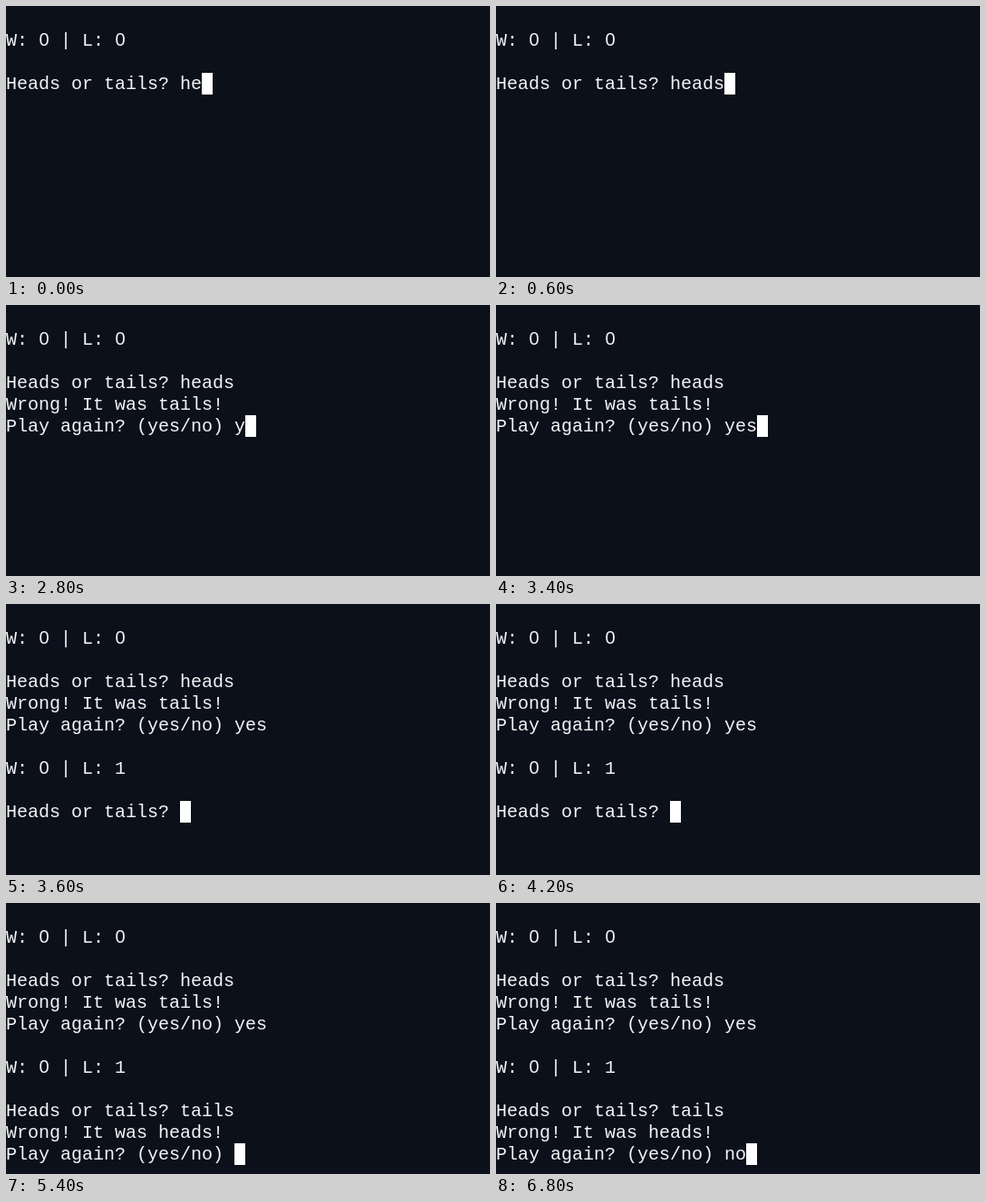
Write an HTML page that moves like this. It is 534 px wide and 300 px high and loops after 8 s.

```html
<!DOCTYPE html>
<html lang="en">
<head>
<meta charset="utf-8">
<title>Heads or tails</title>
<style>
  html, body {
    margin: 0;
    width: 100%;
    height: 100%;
    overflow: hidden;
    background: #0c101b;
  }
  #term {
    position: absolute;
    left: 0;
    top: 27px;
    margin: 0;
    color: #f4f5f7;
    font: 20px/24px "Courier New", "Liberation Mono", monospace;
    white-space: pre;
  }
  /* plain zero without the inner dot */
  .zero {
    display: inline-block;
    width: 12px;
    text-align: center;
    font-family: "Liberation Sans", sans-serif;
    line-height: 20px;
  }
  #cursor {
    position: absolute;
    left: 0;
    top: 26px;
    width: 12px;
    height: 24px;
    background: #fff;
  }
</style>
</head>
<body>
<pre id="term"></pre>
<div id="cursor"></div>
<script>
  const LOOP = 8000, CELL = 12, ROW = 24;
  const term = document.getElementById('term');
  const cursor = document.getElementById('cursor');

  const ask = losses => `W: 0 | L: ${losses}\n\nHeads or tails? `;
  const result = side => `\nWrong! It was ${side}!\nPlay again? (yes/no) `;

  const round1 = ask(0);
  const again1 = round1 + 'heads' + result('tails');
  const round2 = again1 + 'yes\n\n' + ask(1);
  const again2 = round2 + 'tails' + result('heads');

  // [start in ms, screen text]
  const steps = [
    [0, round1 + 'he'],
    [200, round1 + 'hea'],
    [600, round1 + 'heads'],
    [1000, again1],
    [2800, again1 + 'y'],
    [3000, again1 + 'ye'],
    [3200, again1 + 'yes'],
    [3600, round2],
    [4800, round2 + 'tai'],
    [5000, round2 + 'tails'],
    [5200, again2],
    [6600, again2 + 'no']
  ];

  let shown;
  function show(text) {
    if (text === shown) return;
    shown = text;
    term.innerHTML = text.replace(/0/g, '<span class="zero">0</span>');
    const lines = text.split('\n');
    const x = lines[lines.length - 1].length * CELL;
    const y = (lines.length - 1) * ROW;
    cursor.style.transform = `translate(${x}px, ${y}px)`;
  }

  const start = performance.now();
  function tick() {
    const t = (performance.now() - start) % LOOP;
    show(steps.filter(([at]) => at <= t).pop()[1]);
    requestAnimationFrame(tick);
  }
  tick();
</script>
</body>
</html>
```
